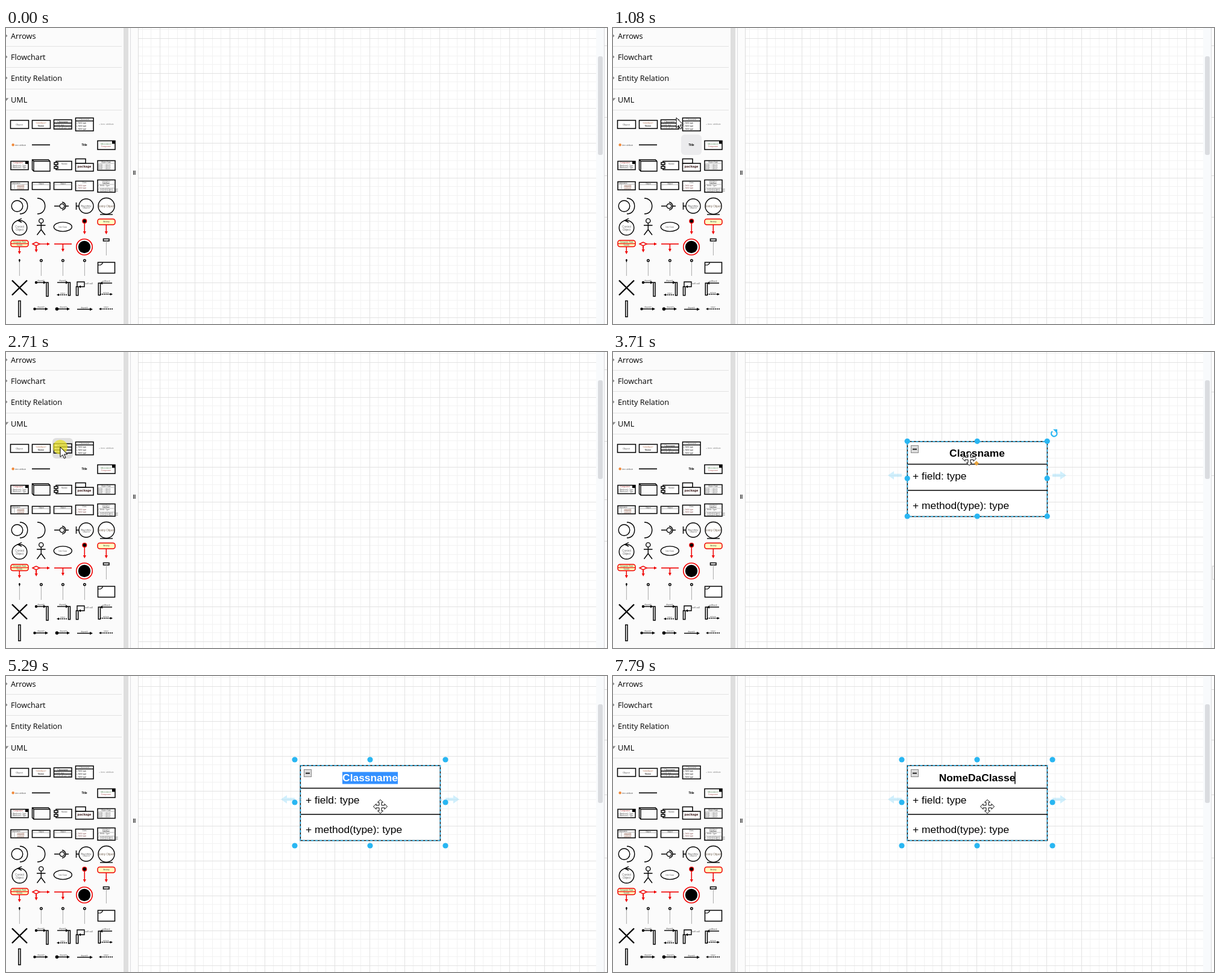
Recreate the animation shown at these times as an HTML page. Size 997x492 px, loop 8000 ms.

```html
<!DOCTYPE html>
<html lang="en">
<head>
<meta charset="utf-8">
<title>UML class editor</title>
<style>
  html, body { margin: 0; width: 100%; height: 100%; overflow: hidden; background: #fff; }
  svg { display: block; width: 997px; height: 492px; }
  text { font-family: "Liberation Sans", Arial, sans-serif; white-space: pre; }
  .menu { font: 12.7px "Open Sans", "Noto Sans", sans-serif; fill: #000; }
</style>
</head>
<body>
<svg id="stage" viewBox="0 0 997 492" xmlns="http://www.w3.org/2000/svg"></svg>
<script>
const LOOP = 8000, BLUE = '#29b6f2', RED = '#f00000';
const range = (n, f) => Array.from({ length: n }, (_, i) => f(i)).join('');

// Drawing helpers, all returning SVG markup
const box = (x, y, w, h, fill, more = '') => `<rect x="${x}" y="${y}" width="${w}" height="${h}" fill="${fill}" ${more}/>`;
const frame = (x, y, w, h, c = '#000', fill = '#fff', r = 0) =>
  box(x, y, w, h, fill, `stroke="${c}" stroke-width="1.5" rx="${r}"`);
const path = (d, c = '#000', w = 1.4, more = '') => `<path d="${d}" fill="none" stroke="${c}" stroke-width="${w}" ${more}/>`;
const solid = (d, c = '#000', more = '') => `<path d="${d}" fill="${c}" ${more}/>`;
const ring = (x, y, r, c = '#000', fill = '#fff', w = 1.4) =>
  `<circle cx="${x}" cy="${y}" r="${r}" fill="${fill}" stroke="${c}" stroke-width="${w}"/>`;
const dot = (x, y, r, c = '#000') => `<circle cx="${x}" cy="${y}" r="${r}" fill="${c}"/>`;
const word = (x, y, size, s, c = '#555', more = 'text-anchor="middle"') =>
  `<text x="${x}" y="${y}" font-size="${size}" fill="${c}" ${more}>${s}</text>`;
const left = (x, y, size, s, c) => word(x, y, size, s, c, '');
const group = (id, inner, more = '') => `<g id="${id}" ${more}>${inner}</g>`;
const down = (x, y1, y2, c = RED) => path(`M${x} ${y1}V${y2 - 4}`, c, 1.5) + solid(`M${x - 2.5} ${y2 - 5}h5l-2.5 5z`, c);
const right = (x1, x2, y, c = '#000', w = 1.4) => path(`M${x1} ${y}H${x2 - 3}`, c, w) + solid(`M${x2 - 5} ${y - 2.5}v5l5 -2.5z`, c);
const back = (x1, x2, y) => path(`M${x1 + 3} ${y}H${x2}`, '#000', 1.3, 'stroke-dasharray="2 1"') + solid(`M${x1 + 4} ${y - 2}v4l-4 -2z`);

function grid() {
  let minor = '', major = '';
  for (let i = -2; i < 50; i++) {
    const x = Math.floor(255 + i * 14.5) + .5;
    if (x > 220 && x < 979) i % 4 ? minor += `M${x} 0V492` : major += `M${x} 0V492`;
  }
  for (let i = -1; i < 33; i++) {
    const y = Math.floor(17 + i * 14.5) + .5;
    i % 4 ? minor += `M220 ${y}H979` : major += `M220 ${y}H979`;
  }
  return path(minor, '#f2f2f2', 1) + path(major, '#e2e2e2', 1);
}

function sidebar() {
  const names = ['Arrows', 'Flowchart', 'Entity Relation', 'UML'];
  const mid = [13, 48, 83, 119], rule = [30, 65, 101, 136];
  return box(0, 0, 206, 492, '#fbfbfb') + box(195, 0, 8, 492, '#dedede') +
    box(206, 0, 1, 492, '#dcdce0') + box(207, 0, 12, 492, '#fcfcfc') + box(219, 0, 1, 492, '#dcdcdc') +
    box(211, 237, 1.3, 7, '#333') + box(213.4, 237, 1.3, 7, '#333') +
    names.map((s, i) => `<text class="menu" x="8" y="${mid[i] + 5}">${s}</text>` + box(0, rule[i], 192, 1, '#e2e2e2') +
      solid(i < 3 ? `M0 ${mid[i] - 2.5}l2.5 2.5l-2.5 2.5z` : 'M0 116.5h4.5l-4.5 5z', '#888')).join('');
}

function icons() {
  const lines = (x, y, n, gap, s, c) => range(n, i => left(x, y + i * gap, 3.2, s, c));
  const rows = [
    frame(7.5, 153.5, 30, 13.5) + word(22, 161.5, 4, 'Object') +
    frame(43.5, 153.5, 30, 13.5) + word(58, 159, 3.5, '«interface»', '#a64') + word(58, 163.5, 4, 'Name', '#000') +
    frame(79.5, 152.5, 29.5, 15.5) + path('M79 158H109M79 163H109', '#000', 1.6) + word(94, 156.5, 3.5, 'Classname', '#000') +
    left(81, 162, 3, '+ field: type') + left(81, 167, 3, '+ method(type): type') +
    frame(115.5, 149.5, 29.5, 21.5) + path('M115 154.5H145') + word(130, 153.3, 3.5, 'Classname') +
    lines(117, 158.5, 3, 5.2, '+ field: type', '#222') + left(154, 161, 3.6, '+ item: attribute', '#888'),

    dot(11.7, 194.3, 2.2, '#f08a3c') + left(15, 195.5, 3, 'item: attribute', '#555') + path('M43 194.3H73', '#000', 1.6) +
    word(130, 196, 4.5, 'Title', '#000', 'text-anchor="middle" font-weight="bold"') +
    frame(152, 187.5, 29, 14.5) + box(176, 188, 5, 4.5, '#000') + word(166, 194, 3.2, '«Annotation»', '#5a8a5a') + word(166, 198, 3.2, 'Component', '#a55'),

    frame(8, 221.5, 29, 14) + box(32, 221.5, 5, 4.5, '#000') + word(20, 225, 3, 'Component', '#a33') + lines(9, 229.5, 2, 3.2, '+ Attribute1: Type') +
    path('M43.5 219H70.5L73 221.5V238H46L43.5 235.5ZM43.5 219L46 221.5H73M46 221.5V238') +
    frame(83, 221.5, 26, 14) + frame(80, 223.5, 6, 3.5) + frame(80, 230, 6, 3.5) + word(97, 226.5, 3, 'Module') +
    frame(115.5, 217.5, 16.5, 7.5) + frame(115.5, 225, 29.5, 13) +
    word(130, 232, 5.7, 'package', '#311', 'text-anchor="middle" font-weight="bold"') +
    frame(152, 220.5, 29, 16) + word(166, 223.5, 3, 'Object:Type', '#444') + path('M152 225H181', '#888', .6) + lines(153, 228.5, 3, 3.2, 'field1 = value1'),

    frame(8, 255.5, 29, 13.5) + left(9, 258.5, 3, 'Tablename') + path('M8 259.5H37M14 259.5V269', '#888', .6) + lines(18, 262.5, 3, 2.6, 'uniqueId', '#854') +
    [43.5, 79.5].map(x => frame(x, 256.5, 29.5, 12) + word(x + 15, 259.5, 3, 'Object', '#444') + path(`M${x} 260.5h30`, '#888', .6)).join('') +
    frame(115.5, 254.5, 29.5, 16) + word(130, 257.8, 3, 'Class', '#555') + lines(117, 263, 2, 3.5, '+ field: type', '#855') +
    frame(152, 252.5, 29, 20.5) + word(166, 255.8, 3, '«interface»', '#555') + word(166, 258.6, 3, 'Interface', '#000') +
    path('M152 260H181M152 266H181', '#888', .6) + lines(153, 263, 1, 3, '+ field1: Type') + lines(153, 268.5, 2, 3, '+ method1(Type): Type'),

    ring(18.5, 296, 9.3) + path('M23 283C40 283 40 309 23 309') + path('M52 283C69 283 69 309 52 309') +
    path('M80 296H88.5M98 296H104') + ring(93, 296, 3.8) + path('M93 289.5A6 6.5 0 0 1 93 302.5') +
    path('M116.5 290V302M116.5 296H121') + ring(133, 296, 12) + word(133, 296.5, 4, 'Boundary') + word(133, 300, 4, 'Object') +
    ring(166.5, 296, 13.5) + path('M156 310H177') + word(166.5, 298, 4.6, 'Entity Object', '#765'),

    ring(22.5, 332, 12.3) + path('M26 316.5L19.5 320L26 323') + word(22.5, 331.5, 4.5, 'Control', '#666') + word(22.5, 336.5, 4.5, 'Object', '#666') +
    ring(58.3, 320.5, 3.6) + path('M58.3 324V335M51 328H65.5M51.5 344L58.3 335L65 344') +
    '<ellipse cx="94.3" cy="330.5" rx="15" ry="7.6" fill="#fff" stroke="#000" stroke-width="1.4"/>' + word(94.3, 331.5, 3.2, 'Use Case') +
    ring(130.3, 321, 3.4, RED, '#000', 1.3) + down(130.3, 324, 343) +
    frame(152, 317.5, 29, 9.5, RED, '#ffffc0', 3.5) + word(166.5, 322.5, 3.2, 'Activity', '#444') + down(166.3, 327, 343),

    frame(8, 353, 29, 10.5, RED, '#ffffc0', 3.5) + path('M8 358.5H37', RED, 1.2) + word(22.5, 357, 3, 'Composite State', '#333') + word(22.5, 362, 3, 'Subtitle', '#555') + down(22.3, 364, 376) +
    path('M44 359L50 356L56 359L50 362ZM50 362V367', RED, 1.4) + right(56, 73, 359, RED, 1.3) + down(50.2, 362, 373) +
    path('M80 359H109', RED, 1.6) + down(94.4, 359, 372) + ring(130, 364, 13.2, RED, '#fff', 1.6) + dot(130, 364, 10.2) +
    frame(161.5, 350.5, 9.5, 3.5) + path('M166.4 354V378', '#aaa', 1),

    [22.4, 58.4, 94.4, 130.4].map((x, i) => path(`M${x} 388V412`, '#aaa', 1) + (i ? ring(x, 386.5, 1.8) : path(`M${x} 384V389M${x - 1.5} 386h3`))).join('') +
    frame(152.5, 389.5, 28, 18) + path('M152.5 394H157L160 391.5V389.5', '#000', 1.2),

    path('M10 419.5L35 444M35 419.5L10 444', '#000', 2.4) +
    dot(50, 423, 2.2) + right(50, 67, 423) + word(58, 421, 3.2, 'dispatch') + frame(67, 423, 3, 23) +
    right(85, 104, 423) + word(94, 421, 3.2, 'dispatch') + frame(103.5, 423, 3, 21.5) + back(84, 102, 443.5) + word(94, 442, 3.2, 'return') +
    frame(116.5, 430, 3.2, 14.5) + path('M118 430V422H130V430H124') + solid('M124 427.7v4.6l-4 -2.3z') + left(131, 426, 3.8, 'self call') +
    frame(153.3, 424, 3.2, 20) + path('M160 424H176') + solid('M160 421.5v5l-4 -2.5z') + word(166, 422, 3.8, 'callback') +
    path('M156 442.5H174', '#000', 1.3, 'stroke-dasharray="2 1"') + solid('M173 440.5v4l4 -2z') + word(166, 440.5, 3.8, 'return'),

    frame(20.8, 453.5, 3.2, 26.5) + dot(47.5, 467, 2.2) + right(48, 70, 467) + word(58, 465, 3.2, 'dispatch') +
    dot(84.5, 467, 2.8) + right(85, 106, 467) + word(95, 465, 3.2, 'dispatch') +
    right(118, 144, 467.5) + word(130, 466, 3.2, 'dispatch') + back(154, 178, 467) + word(166, 465, 3.2, 'return')
  ];
  return rows.join('');
}

// Class shape in its own units: 160 x 86
const classBody = title => box(0, 0, 160, 86, '#fff', 'stroke="#000"') +
  path('M0 26H160M0 56H160', '#000', 1) + title +
  left(6, 43.7, 12, '+ field: type', '#000') + left(6, 77.6, 12, '+ method(type): type', '#000');
const bold = 'text-anchor="middle" font-weight="bold"';

const handles = (x, y, w, h, cy) => range(9, i => i === 4 ? '' :
  dot(x + (i % 3) * w / 2, [y, cy, y + h][Math.floor(i / 3)], 4.6, BLUE));
const arrow = (x, y, turn) => solid('M-12 0l10 -7v4.5h13v5h-13v4.5z', BLUE, `opacity=".22" transform="translate(${x} ${y}) rotate(${turn})"`);
const tags = (list, more = '') => list.map(y => box(993, y, 4, 1, '#dadada')).join('') + more;
const pin = x => path(`M${x - 2} 203.5l4 4m0 -4l-4 4`, '#7fb6d6', 1);

const spoke = 'L-2 -2V-6H-5L0 -11.5L5 -6H2V-2';
const moveShape = 'M-2 -2V-7H-4.5L0 -11.5L4.5 -7H2V-2H7V-4.5L11.5 0L7 4.5V2H2V7H4.5L0 11.5L-4.5 7H-2V2H-7V4.5L-11.5 0L-7 -4.5V-2Z';

document.getElementById('stage').innerHTML =
  box(0, 0, 997, 492, '#fff') + grid() + sidebar() +
  box(979, 0, 13, 492, '#f8fafc') + box(982, 47, 8, 164, '#dadce0', 'rx="3"') + box(992, 0, 1, 492, '#d8d8dc') +
  group('tagsA', tags([29, 148, 245, 314])) +
  group('tagsB', tags([66, 205], frame(994.5, 356, 5, 22, '#d8d8d8'))) +
  group('tagsC', tags([22, 106, 197, 302])) +
  box(0, 0, 34, 34, '#dfdfdf', 'id="hover" rx="6"') + icons() +
  group('tip', box(217, 100, 214, 160, '#000', 'opacity=".12" rx="2"') + box(216.5, 98.5, 212, 159, '#fff', 'stroke="#d0d0d0" rx="2"') +
    group('thumb', classBody(word(80, 17.3, 12, 'Classname', '#000', bold)), 'transform="translate(234.5 115.5) scale(1.1)"') +
    `<text class="menu" x="322" y="242" text-anchor="middle" style="fill:#555">Class</text>`) +
  group('shape',
    group('body', classBody(''), 'transform="translate(488.4 148.8) scale(1.45)"') +
    box(494.5, 155.5, 12, 12, '#dcdcdc', 'stroke="#888"') + box(497, 160.7, 7, 1.8, '#111') +
    box(488.4, 148.8, 232, 124.7, 'none', `stroke="${BLUE}" stroke-width="1.5" stroke-dasharray="4 3"`) +
    box(558, 159.5, 92, 20, '#3390ff', 'id="mark"') +
    word(604, 174, 17.4, 'Classname', '#000', 'id="title" ' + bold) + box(0, 159, 1.5, 20.5, '#000', 'id="caret"')) +
  group('picked', handles(488.2, 148.3, 232, 124.7, 210) + solid('M603 181l4 4l-4 4l-4 -4z', '#e8a33d') +
    path('M729 131.8A4.7 4.7 0 1 0 736 133.5', BLUE, 2.2) + solid('M730 128.5h7v7z', BLUE)) +
  group('editing', handles(479, 139, 250, 143, 210)) +
  group('sides', arrow(468, 205, 0) + arrow(740, 205, 180)) +
  group('around', arrow(468, 210, 0) + arrow(740, 210, 180) + arrow(604, 127, 90) + arrow(604, 294, 270)) +
  group('pins', pin(488) + pin(720.5)) +
  dot(0, 0, 12, '#e8e02a').replace('<circle', '<circle id="glow" opacity=".75"') +
  group('pointer', solid('M0 0V16.5L3.9 12.9L6.5 18.8L9 17.7L6.5 12H11.7Z', '#fff', 'stroke="#000" stroke-linejoin="round"')) +
  group('mover', solid(moveShape, '#fff', 'stroke="#000" stroke-linejoin="round"'));

const $ = id => document.getElementById(id);
const show = (id, on) => $(id).setAttribute('visibility', on ? 'visible' : 'hidden');
const place = (id, p) => $(id).setAttribute('transform', `translate(${p[0]} ${p[1]})`);
const within = (t, a, b) => t >= a && t < b;

// Pointer trips: sampled every `step` ms along [time, x, y] points
const trips = [
  { step: 68.5, pts: [[530, 398, 474], [800, 255, 330], [950, 160, 222], [1078, 105, 149], [1200, 92, 156], [1290, 90, 158]] },
  { step: 74, pts: [[3030, 94, 160], [3250, 235, 190], [3450, 435, 222], [3560, 520, 208], [3696, 591, 177], [3770, 593, 173]] },
  { step: 65, pts: [[4700, 599, 184], [4765, 614, 207], [4830, 621, 217]] }
];
function pointerAt(t) {
  const trip = trips.filter(k => t >= k.pts[0][0]).pop();
  if (!trip) return null;
  const { step, pts } = trip, start = pts[0][0];
  const q = start + Math.floor((t - start) / step + 1e-6) * step;
  const i = pts.findIndex(p => p[0] > q);
  if (i < 0) return pts[pts.length - 1].slice(1);
  const [a, b] = [pts[i - 1], pts[i]], f = (q - a[0]) / (b[0] - a[0]);
  return [1, 2].map(k => Math.round(a[k] + (b[k] - a[k]) * f));
}

const typed = 'NomeDaClasse';
const keys = [5760, 5960, 6050, 6150, 6550, 6680, 6940, 7030, 7130, 7330, 7530, 7790];
const pen = document.createElement('canvas').getContext('2d');
pen.font = 'bold 17.4px "Liberation Sans", Arial, sans-serif';

function hover(t) {
  const p = pointerAt(t - 68);
  const on = p && p[0] > 4 && p[0] < 184 && p[1] > 143 && p[1] < 483 && t < 3200;
  show('hover', on);
  if (!on) return;
  $('hover').setAttribute('x', Math.floor((p[0] - 4) / 36) * 36 + 5);
  $('hover').setAttribute('y', Math.floor((p[1] - 143) / 34) * 34 + 143);
  $('hover').setAttribute('fill', within(t, 1290, 3030) ? '#dfdfdf' : '#ebebed');
}

function draw(t) {
  const p = pointerAt(t), made = t >= 2830, edit = t >= 4300;
  const move = within(t, 3540, 4300) || t >= 4830;
  show('pointer', p && !move);
  show('mover', p && move);
  if (p) ['pointer', 'mover', 'glow'].forEach(id => place(id, p));
  hover(t);
  show('glow', within(t, 2710, 2770) || within(t, 3840, 4110) || within(t, 4170, 4230));
  show('tip', within(t, 1360, 2710));
  show('tagsA', !made);
  show('tagsB', made && t < 4420);
  show('tagsC', t >= 4420);
  show('shape', made);
  show('picked', made && !edit);
  show('editing', edit);
  show('around', within(t, 3540, 3620));
  show('sides', within(t, 3620, 4300) || t >= 5290);
  show('pins', t >= 4765);

  const n = keys.filter(k => t >= k).length, marked = edit && !n;
  const s = n ? typed.slice(0, n) : 'Classname';
  const title = $('title');
  if (title.textContent !== s) title.textContent = s;
  title.setAttribute('y', edit ? 175 : 174);
  title.setAttribute('fill', marked ? '#fff' : '#000');
  // explicit values inside the hidden shape group would show through
  $('mark').setAttribute('visibility', marked ? 'inherit' : 'hidden');
  $('caret').setAttribute('visibility', n ? 'inherit' : 'hidden');
  $('caret').setAttribute('x', 603.5 + pen.measureText(s).width / 2 - .7);
}

const born = performance.now();
function tick() {
  draw((performance.now() - born) % LOOP);
  requestAnimationFrame(tick);
}
tick();
</script>
</body>
</html>
```
